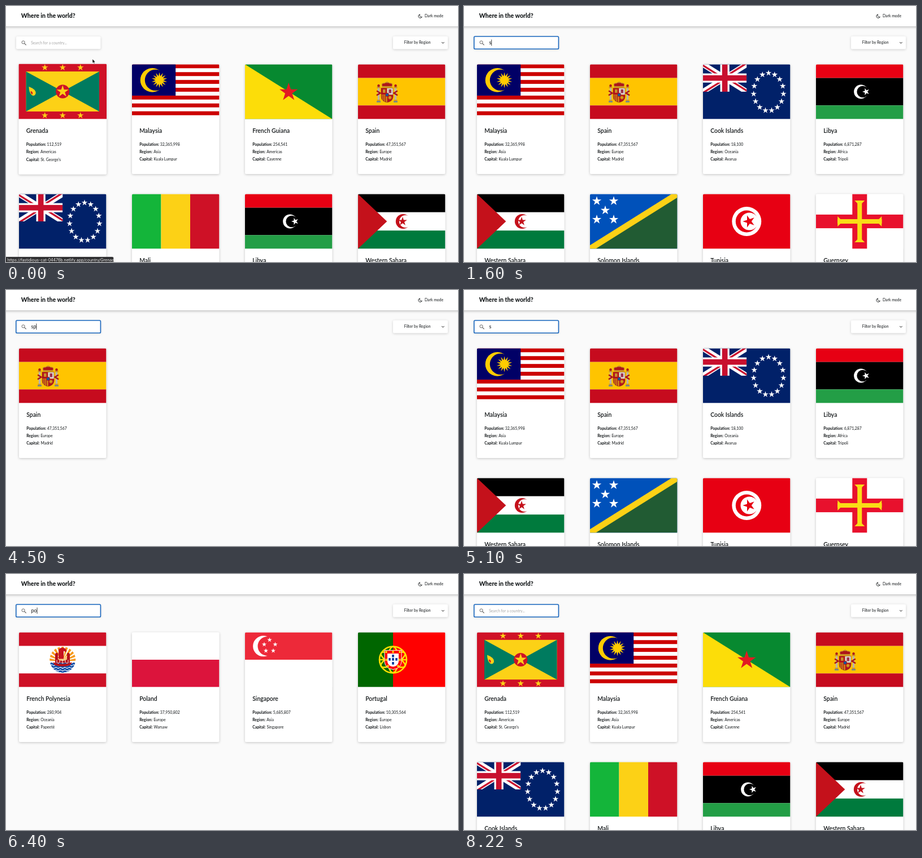
Write an HTML page with a canvas that moves like this. It is 800 by 454 pixels and loops after 8350 ms.

```html
<!DOCTYPE html>
<html lang="en">
<head>
<meta charset="utf-8">
<title>Where in the world?</title>
<style>
html, body { margin: 0; width: 100%; height: 100%; overflow: hidden; background: #fafafa; }
canvas { display: block; width: 800px; height: 454px; }
</style>
</head>
<body>
<canvas id="stage"></canvas>
<script>
const LOOP = 8350, W = 154.5, H = 97.2, MX = W / 2, MY = H / 2;
const canvas = document.getElementById('stage');
const dpr = window.devicePixelRatio || 1;
canvas.width = 800 * dpr;
canvas.height = 454 * dpr;
const c = canvas.getContext('2d');
const TAU = Math.PI * 2;

// ---- drawing helpers ----
function rect(color, x, y, w, h) {
  c.fillStyle = color;
  c.fillRect(x, y, w, h);
}
function poly(color, ...p) {
  c.fillStyle = color;
  c.beginPath();
  for (let i = 0; i < p.length; i += 2) c.lineTo(p[i], p[i + 1]);
  c.closePath();
  c.fill();
}
function disc(color, x, y, r) {
  c.fillStyle = color;
  c.beginPath();
  c.arc(x, y, r, 0, TAU);
  c.fill();
}
function star(color, x, y, r, n = 5, ratio = 0.382, turn = 0) {
  const p = [];
  for (let i = 0; i < n * 2; i++) {
    const a = turn - Math.PI / 2 + i * Math.PI / n, d = i % 2 ? r * ratio : r;
    p.push(x + d * Math.cos(a), y + d * Math.sin(a));
  }
  poly(color, ...p);
}
function line(color, width, ...p) {
  c.strokeStyle = color;
  c.lineWidth = width;
  c.beginPath();
  for (let i = 0; i < p.length; i += 2) c.lineTo(p[i], p[i + 1]);
  c.stroke();
}
function path(d, fill, stroke, width) {
  const p = new Path2D(d);
  if (fill) { c.fillStyle = fill; c.fill(p); }
  if (stroke) { c.strokeStyle = stroke; c.lineWidth = width; c.stroke(p); }
}
function crescent(color, back, x, y, r, dx, r2) {
  disc(color, x, y, r);
  disc(back, x + dx, y, r2);
}
function bands(a, b, d, h1 = H / 3, h2 = 2 * H / 3) {
  rect(a, 0, 0, W, h1);
  rect(b, 0, h1, W, h2 - h1);
  rect(d, 0, h2, W, H - h2);
}
function text(s, x, y, size, weight = 400, color = '#111517') {
  c.font = `${weight} ${size}px Lato, "Open Sans", sans-serif`;
  c.fillStyle = color;
  c.fillText(s, x, y);
}
function box(x, y, w, h, r, color = '#fff', blur = 4, dy = 1, alpha = 0.22) {
  c.save();
  c.shadowColor = `rgba(0,0,0,${alpha})`;
  c.shadowBlur = blur * dpr;
  c.shadowOffsetY = dy * dpr;
  c.fillStyle = color;
  c.beginPath();
  c.roundRect(x, y, w, h, r);
  c.fill();
  c.restore();
}

// ---- flags ----
function unionJack(w, h) {
  c.save();
  c.beginPath();
  c.rect(0, 0, w, h);
  c.clip();
  const x = w / 2, y = h / 2, u = h / 30, len = Math.hypot(x, y);
  line('#fff', 6 * u, 0, 0, w, h);
  line('#fff', 6 * u, w, 0, 0, h);
  for (const [sx, sy] of [[-1, -1], [1, -1], [1, 1], [-1, 1]]) {
    const ox = sy * y / len * u, oy = -sx * x / len * u;
    line('#c8102e', 2 * u, x + ox, y + oy, x + sx * x * 1.1 + ox, y + sy * y * 1.1 + oy);
  }
  rect('#fff', x - 5 * u, 0, 10 * u, h);
  rect('#fff', 0, y - 5 * u, w, 10 * u);
  rect('#c8102e', x - 3 * u, 0, 6 * u, h);
  rect('#c8102e', 0, y - 3 * u, w, 6 * u);
  c.restore();
}
function spanishArms() {
  for (const s of [-1, 1]) {
    const x = 51.5 + s * 15;
    rect('#b9b5a8', x - 1.7, 42, 3.4, 22);
    rect('#c8912b', x - 3, 39.5, 6, 2.6);
    rect('#c8912b', x - 3, 63, 6, 2.4);
    disc('#ad1519', x, 37.8, 2.2);
    rect('#5b7ea8', x - 3.5, 65.4, 7, 2);
    line('#ad1519', 2.4, x + s * 3.4, 47, x - s * 3, 51, x + s * 3.6, 55);
  }
  path('M43 39.5Q40 33 47 33.5Q51.5 30 56 33.5Q63 33 60 39.5Z', '#ad1519', '#c8912b', 1.2);
  disc('#c8912b', 51.5, 32, 1.4);
  rect('#c8912b', 43, 38.8, 17, 2.2);
  c.save();
  c.clip(new Path2D('M41 42H62V58Q61 66 51.5 67.5Q42 66 41 58Z'));
  rect('#b3131c', 41, 42, 10.5, 12);
  rect('#d9d6d0', 51.5, 42, 11, 12);
  rect('#d4a017', 41, 54, 10.5, 14);
  rect('#b3131c', 51.5, 54, 11, 14);
  rect('#c8912b', 44, 44.5, 4.5, 6);
  rect('#a0304f', 54.5, 44.5, 4.5, 6.5);
  for (let x = 42; x < 51; x += 3) rect('#ad1519', x, 54, 1.5, 14);
  star('#d4a017', 56.5, 59, 4, 8, 0.5);
  c.restore();
  path('M41 42H62V58Q61 66 51.5 67.5Q42 66 41 58Z', null, '#7d2a20', 0.6);
  disc('#ad1519', 51.5, 54, 3.4);
  disc('#16589b', 51.5, 54, 2.5);
}
function fleur(x) {
  c.save();
  c.translate(x, 16);
  const y = '#fcdd09';
  path('M0-15Q8-6 2.6 3H-2.6Q-8-6 0-15Z', y);
  for (const s of [-1, 1]) {
    c.save();
    c.scale(s, 1);
    path('M2 4Q3-6 9-6Q14-4 11.5 2Q10.5 4 8.5 2.5Q10-2 7.5-1.5Q5 0 4.4 4Z', y);
    path('M1 6Q2 11 6 11Q6 8 4 6Z', y);
    c.restore();
  }
  rect(y, -7, 3.4, 14, 2.6);
  path('M-2 6H2L0 14Z', y);
  c.restore();
}
function polynesianEmblem() {
  c.save();
  c.beginPath();
  c.arc(MX, MY, 23, 0, TAU);
  c.clip();
  for (let i = 0; i < 11; i++) {
    const a = Math.PI * (1 + (i + 0.2) / 11), b = a + Math.PI * 0.6 / 11;
    poly('#f79a1c', MX, MY + 3, MX + 30 * Math.cos(a), MY + 3 + 30 * Math.sin(a),
      MX + 30 * Math.cos(b), MY + 3 + 30 * Math.sin(b));
  }
  rect('#fff', MX - 25, MY + 4, 50, 25);
  for (let j = 0; j < 4; j++) {
    c.strokeStyle = '#0f4fa8';
    c.lineWidth = 3;
    c.beginPath();
    for (let x = -24; x <= 24; x++) c.lineTo(MX + x, MY + 7.5 + j * 4.6 + Math.cos(x * 0.8) * 0.9);
    c.stroke();
  }
  c.restore();
  path('M60 53Q77 59 94 53L91 58Q77 63 63 58Z', '#b5121b');
  path('M64 54V40Q64 35 69 37V48Q77 53 85 48V37Q90 35 90 40V54Z', '#b5121b');
  path('M70 47V32Q70 28 77 27Q85 28 84 35L79 33V47Z', '#c8141f');
  for (let i = 0; i < 5; i++) line('#fff', 0.9, 67 + i * 5, 49, 67 + i * 5, 54);
}
function portugueseArms() {
  const x = 62, y = MY, g = '#ffe000';
  c.strokeStyle = g;
  c.lineWidth = 2.6;
  for (const [rx, ry, a] of [[24, 23.5, 0], [24, 8, 0.5], [24, 8, -0.5], [9, 23, 0]]) {
    c.beginPath();
    c.ellipse(x, y, rx, ry, a, 0, TAU);
    c.stroke();
  }
  line(g, 2.6, x - 24, y, x + 24, y);
  path('M47 32H77V52Q76 64 62 66Q48 64 47 52Z', '#f00', '#fff', 1);
  path('M52 37.5H72V52Q71 59.5 62 61Q53 59.5 52 52Z', '#fff');
  for (const [dx, dy] of [[0, -7], [-6, -1], [0, -1], [6, -1], [0, 6]])
    rect('#003399', x + dx - 1.8, y + dy - 2, 3.6, 4.6);
  for (const [dx, dy] of [[-12, -14], [0, -14], [12, -14], [-12, 0], [12, 0], [-9, 11], [9, 11]])
    rect(g, x + dx - 1.6, y + dy - 1.6, 3.2, 3.6);
}

const flags = {
  grenada() {
    rect('#cf1126', 0, 0, W, H);
    rect('#fcd116', 13, 13.4, 128.5, 70.4);
    poly('#007b5f', 13, 13.4, MX, MY, 13, 83.8);
    poly('#007b5f', 141.5, 13.4, MX, MY, 141.5, 83.8);
    disc('#cf1126', MX, MY, 12);
    star('#fcd116', MX, MY, 11);
    for (const x of [46, MX, 108.5]) for (const y of [6.4, 90.8]) star('#fcd116', x, y, 6);
    path('M18 40Q31 45 30 52Q28 58 23 55Q18 50 18 40Z', '#fcd116');
    path('M21 48Q26 49 24 54Q21 52 21 48Z', '#cf1126');
  },
  malaysia() {
    rect('#fff', 0, 0, W, H);
    for (let i = 0; i < 14; i += 2) rect('#cc0001', 0, i * H / 14, W, H / 14);
    rect('#010066', 0, 0, 77.2, H * 8 / 14);
    crescent('#fc0', '#010066', 36, 28, 21.3, 5.5, 18.7);
    star('#fc0', 48.5, 28, 14, 14, 0.5);
  },
  guiana() {
    rect('#078930', 0, 0, W, H);
    poly('#fcdd09', 0, 0, W, H, 0, H);
    star('#e21a22', MX, MY + 1, 17);
  },
  spain() {
    bands('#c60b1e', '#ffc400', '#c60b1e', H / 4, H * 0.75);
    spanishArms();
  },
  cook() {
    rect('#012169', 0, 0, W, H);
    unionJack(W / 2, H / 2);
    for (let i = 0; i < 15; i++) {
      const a = i * TAU / 15 - Math.PI / 2;
      star('#fff', 116 + 26.5 * Math.cos(a), 49 + 33.5 * Math.sin(a), 5.6);
    }
  },
  mali() {
    ['#14b53a', '#fcd116', '#ce1126'].forEach((k, i) => rect(k, i * W / 3, 0, W / 3, H));
  },
  libya() {
    bands('#e70013', '#000', '#239e46', H / 4, H * 0.75);
    crescent('#fff', '#000', 79.5, MY, 12.4, 3.2, 10.3);
    star('#fff', 88.5, MY, 6.6, 5, 0.382, -Math.PI / 2);
  },
  sahara() {
    bands('#000', '#fff', '#007a3d');
    poly('#c4111b', 0, 0, 51.3, MY, 0, H);
    crescent('#c4111b', '#fff', 79.8, MY, 13, 4.2, 11);
    star('#c4111b', 79, MY, 8.3);
  },
  solomon() {
    rect('#0051ba', 0, 0, W, H);
    poly('#215b33', W, 0, W, H, 0, H);
    poly('#fcd116', 0, H, 0, H - 6.4, W - 10.2, 0, W, 0, W, 6.4, 10.2, H);
    for (const [x, y] of [[12, 12.5], [42, 12.5], [27, 29], [12, 45.3], [42, 45.3]]) star('#fff', x, y, 8.6);
  },
  tunisia() {
    rect('#e70013', 0, 0, W, H);
    disc('#fff', MX, MY, 26);
    crescent('#e70013', '#fff', MX, MY, 19.5, 4.8, 15.6);
    star('#e70013', 81.5, MY, 11.3, 5, 0.382, -Math.PI / 2);
  },
  guernsey() {
    rect('#fff', 0, 0, W, H);
    rect('#e8112d', 64.3, 0, 26, H);
    rect('#e8112d', 0, 36.5, W, 24.2);
    const k = '#f9dd16', a = 4;
    rect(k, 38, MY - a, 78.5, a * 2);
    rect(k, MX - a, 11.5, a * 2, 74);
    for (const s of [-1, 1]) {
      poly(k, MX + s * 39, MY - 9, MX + s * 39, MY + 9, MX + s * 34, MY + a, MX + s * 34, MY - a);
      poly(k, MX - 9, MY + s * 37, MX + 9, MY + s * 37, MX + a, MY + s * 32, MX - a, MY + s * 32);
    }
  },
  seychelles() {
    rect('#003f87', 0, 0, W, H);
    poly('#fcd856', 0, H, W / 3, 0, W, 0, W, H);
    poly('#d62828', 0, H, W * 2 / 3, 0, W, 0, W, H);
    poly('#fff', 0, H, W, H / 3, W, H);
    poly('#007a3d', 0, H, W, H * 2 / 3, W, H);
  },
  guadeloupe() {
    rect('#000', 0, 0, W, H);
    rect('#002395', 0, 0, W, 32);
    [29, 77, 125].forEach(fleur);
    for (let i = 0; i < 7; i++) {
      line('#138a1f', 2, 58, 64, 22 + i * 3.2, 41 + i * 3.4 + (i % 2) * 3);
      line('#138a1f', 1.8, 92, 70 + i, 132 - i * 2, 77 + i * 2);
    }
    star('#fcdd09', MX, 66, 32, 30, 0.82);
  },
  syria() {
    bands('#ce1126', '#fff', '#000');
    for (const x of [51.5, 103]) star('#007a3d', x, MY + 1, 13.8);
  },
  philippines() {
    rect('#0038a8', 0, 0, W, MY);
    rect('#ce1126', 0, MY, W, MY);
    poly('#fff', 0, 0, 67, MY, 0, H);
    for (let i = 0; i < 8; i++) {
      for (const d of [-0.16, 0, 0.16]) {
        const a = i * TAU / 8 + d, r = d ? 14 : 16.5;
        line('#fcd116', 1.6, 24, MY, 24 + r * Math.cos(a), MY + r * Math.sin(a));
      }
    }
    disc('#fff', 24, MY, 10);
    disc('#fcd116', 24, MY, 9.2);
    for (const [x, y, a] of [[6, 13.5, 0.3], [54.5, MY, Math.PI / 2], [6, 84, -0.3]])
      star('#fcd116', x, y, 4.6, 5, 0.382, a);
  },
  polynesia() {
    bands('#ce1126', '#fff', '#ce1126', H / 4, H * 0.75);
    polynesianEmblem();
  },
  poland() {
    rect('#fff', 0, 0, W, MY);
    rect('#dc143c', 0, MY, W, MY);
  },
  singapore() {
    rect('#fff', 0, 0, W, H);
    rect('#ed2939', 0, 0, W, MY);
    crescent('#fff', '#ed2939', 32.5, 24.5, 18.4, 7, 17);
    for (const [x, y] of [[43.5, 13.5], [34, 21.5], [53.5, 21.5], [37, 32.7], [50, 32.7]]) star('#fff', x, y, 4.4);
  },
  portugal() {
    rect('#060', 0, 0, 62, H);
    rect('#f00', 62, 0, W - 62, H);
    portugueseArms();
  }
};

// ---- content ----
const info = {
  grenada: ['Grenada', '112,519', 'Americas', "St. George's"],
  malaysia: ['Malaysia', '32,365,998', 'Asia', 'Kuala Lumpur'],
  guiana: ['French Guiana', '254,541', 'Americas', 'Cayenne'],
  spain: ['Spain', '47,351,567', 'Europe', 'Madrid'],
  cook: ['Cook Islands', '18,100', 'Oceania', 'Avarua'],
  mali: ['Mali', '20,250,834', 'Africa', 'Bamako'],
  libya: ['Libya', '6,871,287', 'Africa', 'Tripoli'],
  sahara: ['Western Sahara', '510,713', 'Africa', 'El Aaiún'],
  tunisia: ['Tunisia', '11,818,618', 'Africa', 'Tunis'],
  solomon: ['Solomon Islands'], guernsey: ['Guernsey'], seychelles: ['Seychelles'],
  guadeloupe: ['Guadeloupe'], syria: ['Syria'], philippines: ['Philippines'],
  polynesia: ['French Polynesia', '280,904', 'Oceania', 'Papeetē'],
  poland: ['Poland', '37,950,802', 'Europe', 'Warsaw'],
  singapore: ['Singapore', '5,685,807', 'Asia', 'Singapore'],
  portugal: ['Portugal', '10,305,564', 'Europe', 'Lisbon']
};
const lists = {
  '': 'grenada malaysia guiana spain cook mali libya sahara',
  s: 'malaysia spain cook libya sahara solomon tunisia guernsey',
  sp: 'spain',
  spa: 'spain',
  p: 'spain mali sahara tunisia seychelles guadeloupe syria philippines',
  po: 'polynesia poland singapore portugal'
};
const keys = [[0, ''], [1400, 's'], [1800, 'sp'], [2100, 'spa'], [4500, 'sp'], [4600, 's'],
  [5800, 'p'], [6400, 'po'], [7800, 'p'], [8000, '']];
const FOCUS = 900;

const ramp = (t, a, b) => Math.min(1, Math.max(0, (t - a) / (b - a)));
const ease = k => k * k * (3 - 2 * k);

function card(id, i, scale) {
  c.save();
  c.translate(23 + (i % 4) * 200 + MX, 103.4 + Math.floor(i / 4) * 230 + 97.3);
  c.scale(scale, scale);
  c.translate(-MX, -97.3);
  box(0, 0, W, 194.6, 2);
  c.save();
  c.beginPath();
  c.roundRect(0, 0, W, H, [2, 2, 0, 0]);
  c.clip();
  flags[id]();
  c.restore();
  const [name, people, region, capital] = info[id];
  text(name, 13.2, 121.8, 10.4, 600);
  if (people) {
    [['Population:', people, 49.8], ['Region:', region, 38.2], ['Capital:', capital, 38.5]].forEach(([k, v, x], n) => {
      const y = 144.2 + n * 13.4;
      text(k, 13.2, y, 6.85, 700);
      text(v, x, y, 6.85);
    });
  }
  c.restore();
}

function header() {
  box(-10, -10, 820, 46, 0, '#fff', 5, 1, 0.3);
  text('Where in the world?', 26.8, 21, 10.5, 800);
  text('Dark mode', 741, 20.2, 6.8);
  path('M732.6 14.8A3.3 3.3 0 1 0 736.3 19.2A3 3 0 0 1 732.6 14.8Z', null, '#111517', 0.9);
}

function controls(query, focused, caret) {
  box(18, 54, 149.5, 22.3, 2, '#fff', 4, 1, 0.18);
  if (focused) {
    c.strokeStyle = '#1967be';
    c.lineWidth = 1.6;
    c.beginPath();
    c.roundRect(17.8, 54, 149.6, 22.3, 1.8);
    c.stroke();
  }
  c.strokeStyle = '#555';
  c.lineWidth = 0.9;
  c.beginPath();
  c.arc(30.6, 64.4, 2.6, 0, TAU);
  c.stroke();
  line('#555', 1.1, 32.6, 66.4, 35.6, 69.4);
  if (query) {
    text(query, 44.5, 68, 9);
    if (caret) rect('#111517', 44.5 + c.measureText(query).width, 59.5, 0.8, 11);
  } else {
    text('Search for a country...', 44.2, 67.8, 6.7, 400, '#a6a6a6');
  }
  box(685, 53.8, 97, 22.6, 2, '#fff', 4, 1, 0.18);
  text('Filter by Region', 704.8, 67.4, 6.8);
  line('#222', 1, 771.2, 64, 773.4, 66.3, 775.6, 64);
}

function pointer(t) {
  if (t >= keys[1][0]) return;
  const k = ease(ramp(t, 50, 800));
  c.save();
  c.translate(153 - 45 * k, 94 - 29 * k);
  if (k > 0.66) {
    path('M-1.6-5Q0-5 0-3.8Q0-5 1.6-5M0-4V4M-1.6 5Q0 5 0 3.8Q0 5 1.6 5', null, '#222', 0.8);
  } else {
    path('M0 0V7.2L1.7 5.7L2.8 8.3L4.1 7.7L3 5.2H5.2Z', '#000', '#fff', 0.6);
  }
  c.restore();
}

function linkBubble(t) {
  const a = 1 - ramp(t, 300, 600);
  if (!a) return;
  c.save();
  c.globalAlpha = a;
  box(-5, 445, 195.5, 14, [0, 3, 0, 0], '#303032', 2, 0, 0.3);
  c.font = '400 7px Inter, "Liberation Sans", sans-serif';
  c.fillStyle = '#f2f2f2';
  c.fillText('https://fastidious-cat-04476b.netlify.app/country/Grenada', 2.2, 452.6);
  c.restore();
}

function draw(t) {
  c.setTransform(dpr, 0, 0, dpr, 0, 0);
  rect('#fafafa', 0, 0, 800, 454);
  const [since, query] = keys.filter(k => k[0] <= t).pop();
  const caret = Math.floor((t - since) / 500) % 2 === 0;
  const hover = 1 + 0.008 * (1 - ease(ramp(t, 60, 350)));
  lists[query].split(' ').forEach((id, i) => card(id, i, i ? 1 : hover));
  header();
  controls(query, t >= FOCUS, caret);
  linkBubble(t);
  pointer(t);
}

const start = performance.now();
function tick() {
  draw((performance.now() - start) % LOOP);
  requestAnimationFrame(tick);
}
tick();
</script>
</body>
</html>
```
